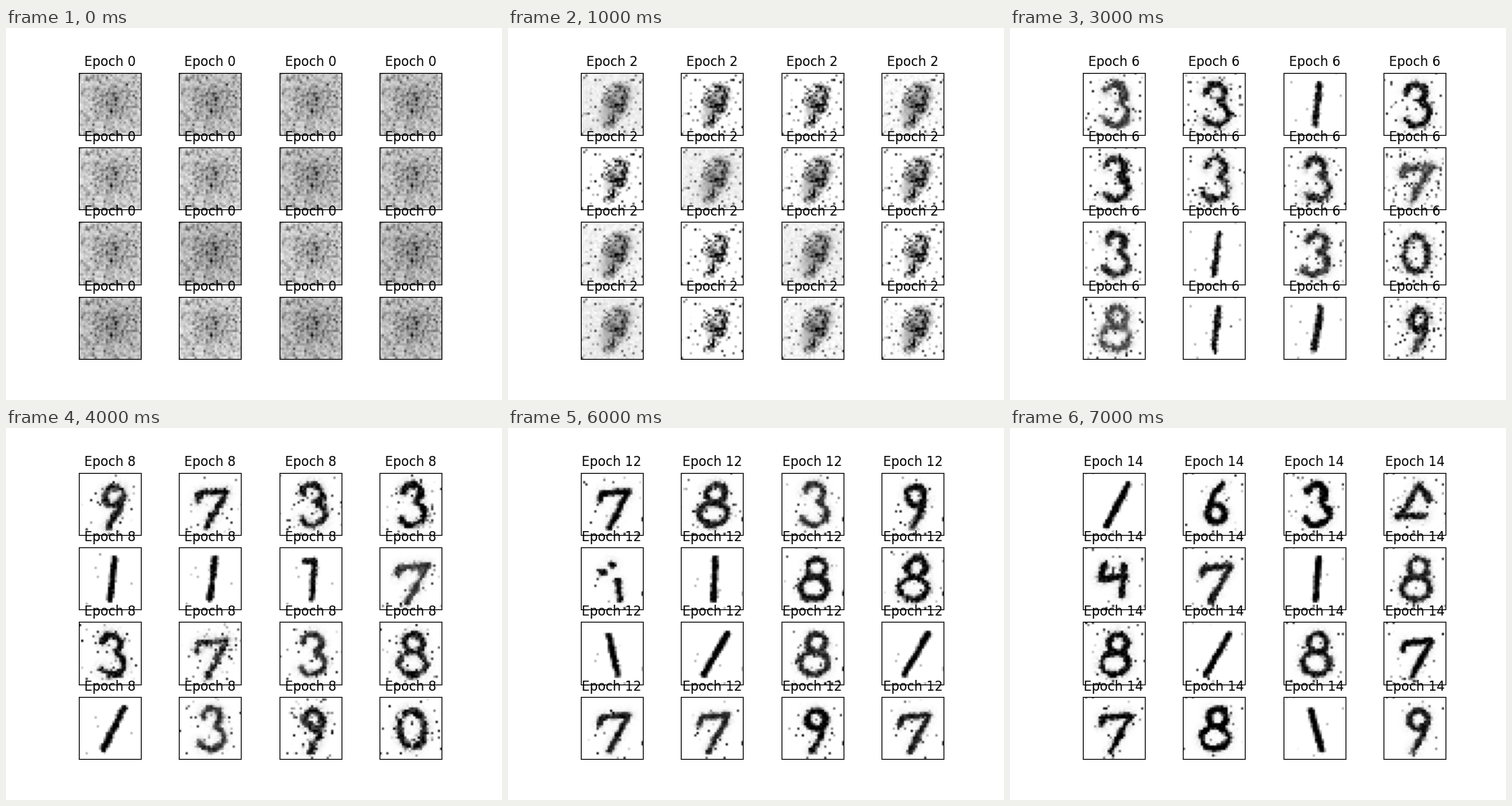
Write a matplotlib script that moves like this. It is 640 px wide and 480 px high and loops after 8000 ms.

```python
import numpy as np
import matplotlib.pyplot as plt
from matplotlib.animation import FuncAnimation

N = 28
CELLS = 16
STEP = 2  # epochs between pictures
ROWS, COLS = np.mgrid[0:N, 0:N]


def line(*xy):
    """Points along a polyline through x, y, x, y, ..."""
    x, y = np.reshape(xy, (-1, 2)).T
    t = np.linspace(0, len(x) - 1, 60)
    knots = np.arange(len(x))
    return np.column_stack([np.interp(t, knots, x), np.interp(t, knots, y)])


def arc(cx, cy, rx, ry, start=0, end=360):
    a = np.radians(np.linspace(start, end, 60))
    return np.column_stack([cx + rx * np.cos(a), cy + ry * np.sin(a)])


SHAPES = {
    "0": [arc(14, 14, 5.5, 8)],
    "1": [line(11, 6, 15, 6, 14, 23)],
    "|": [line(15.5, 5, 13.5, 23)],
    "/": [line(20, 5, 10, 23)],
    "\\": [line(12, 6, 16, 23)],
    "i": [line(13, 7, 14, 8), line(9, 11, 10, 11), line(16, 15, 17, 23)],
    "2": [line(6, 19, 18, 19), line(9, 17, 15, 5, 20, 12)],
    "3": [arc(14, 9, 4, 4, 190, 420), arc(14, 18, 5.5, 5, -60, 150)],
    "4": [line(9, 8, 7, 14, 18, 13), line(18, 8, 17, 21)],
    "6": [line(18, 5, 13, 10, 11, 17), arc(14, 18, 4, 4)],
    "7": [line(8, 12, 9, 9, 21, 8, 17, 15, 12, 24)],
    "8": [arc(15, 9, 4, 4), arc(14, 18, 6, 5)],
    "9": [arc(15, 10, 4, 4), line(19, 10, 17, 17, 13, 24)],
}


def distance(shape, slant=0.0):
    """Distance of every pixel to the nearest stroke of a shape."""
    x, y = np.vstack(SHAPES[shape]).T
    x = x + slant * (14 - y)
    return np.hypot(COLS[..., None] - x, ROWS[..., None] - y).min(axis=2)


def blur(field):
    shifts = [(i, j) for i in (-1, 0, 1) for j in (-1, 0, 1)]
    return sum(np.roll(field, s, (0, 1)) for s in shifts) / 9


def static(seed):
    """Noise shared by all cells, denser around the middle."""
    rng = np.random.default_rng(seed)
    core = np.exp(-((COLS - 15) ** 2 + (ROWS - 13) ** 2) / 50)
    field = 0.1 + rng.gamma(2, 0.075, (N, N)) * (1 + 0.6 * core) + 0.18 * core
    lifts = rng.uniform(-0.04, 0.04, CELLS)
    return [np.clip(field + k + rng.normal(0, 0.015, (N, N)), 0, 1) for k in lifts]


def clouds(seed, shapes, slant, dust):
    """One grainy shape per cell in shared noise, at a random contrast."""
    rng = np.random.default_rng(seed)
    tilt = np.hypot((COLS - 15 + 0.4 * (ROWS - 14)) / 6, (ROWS - 14) / 9)
    u, v, w = rng.random((3, N, N))
    haze = 0.05 + 0.05 * u + 0.25 * np.exp(-tilt ** 4)
    dots = (w < dust) * (0.15 + 0.6 * u)
    out = []
    for shape, hard in zip(shapes, rng.random(CELLS) ** 1.2):
        body = np.clip((3.2 - distance(shape, slant)) / 2, 0, 1)
        field = np.maximum(haze + 0.65 * body * v ** 1.5, dots)
        field += rng.normal(0, 0.02, (N, N))
        out.append(np.clip((field - 0.28 * hard) * (1 + 1.1 * hard), 0, 1))
    return out


def digits(seed, shapes, rough):
    """Separate digits; `rough` sets how ragged and dusty they are."""
    rng = np.random.default_rng(seed)
    shared = rng.random((N, N)) < 0.008
    out = []
    for shape in shapes:
        clean = shape in "1|/\\"
        grit = rough * (0.5 if clean else rng.uniform(0.75, 1.15))
        ink = 1.2 if clean else rng.uniform(1.25 - 0.6 * rough, 1.25)
        d = distance(shape, rng.normal(0, 0.03))
        u, v, own = rng.random((3, N, N))
        wobble = 6 * (blur(rng.random((N, N))) - 0.5) + 1.6 * (u - 0.5)
        edge = np.clip(1.9 - d + grit * wobble, 0, 1)
        img = ink * edge * (1 - 0.85 * grit * v)
        if not clean:
            img += 0.35 * grit * v * np.exp(-(d / 3) ** 2)
        chance = (0.003 if clean else 0.3 * grit ** 2) * np.exp(-d / 6)
        dots = (own < chance) * u ** 1.5 + shared * (0.3 if clean else 0.8)
        out.append(np.clip(np.maximum(img, dots), 0, 1))
    return out


def shuffled(first, second, seed):
    """Cells drawn at random from two neighbouring sets."""
    return np.random.default_rng(seed).choice(list(first + second), CELLS, replace=False)


early = "33|3" "3337" "3|30" "8||9"
middle = "13i8" "9797" "7197" "/779"
late = "/632" "47|8" "8/87" "78\\9"
pictures = [
    static(3),
    clouds(8, "9" * CELLS, slant=0.15, dust=0.1),
    clouds(17, "3333" "3330" "3330" "3333", slant=0.2, dust=0.06),
    digits(21, early, 0.8),
    digits(22, shuffled(early, middle, 5), 0.65),
    digits(23, middle, 0.55),
    digits(24, shuffled(middle, late, 9), 0.5),
    digits(25, late, 0.5),
]

fig, axes = plt.subplots(4, 4, figsize=(6.4, 4.8), dpi=100)
cells = []
for ax in axes.flat:
    ax.set_xticks([])
    ax.set_yticks([])
    cells.append((ax, ax.imshow(np.zeros((N, N)), cmap="gray_r", vmin=0, vmax=1)))


def update(i):
    for (ax, image), data in zip(cells, pictures[i]):
        image.set_data(data)
        ax.set_title(f"Epoch {i * STEP}")
    return []


anim = FuncAnimation(fig, update, frames=len(pictures), interval=1000,
                     repeat=True, repeat_delay=0)
plt.show()
```
